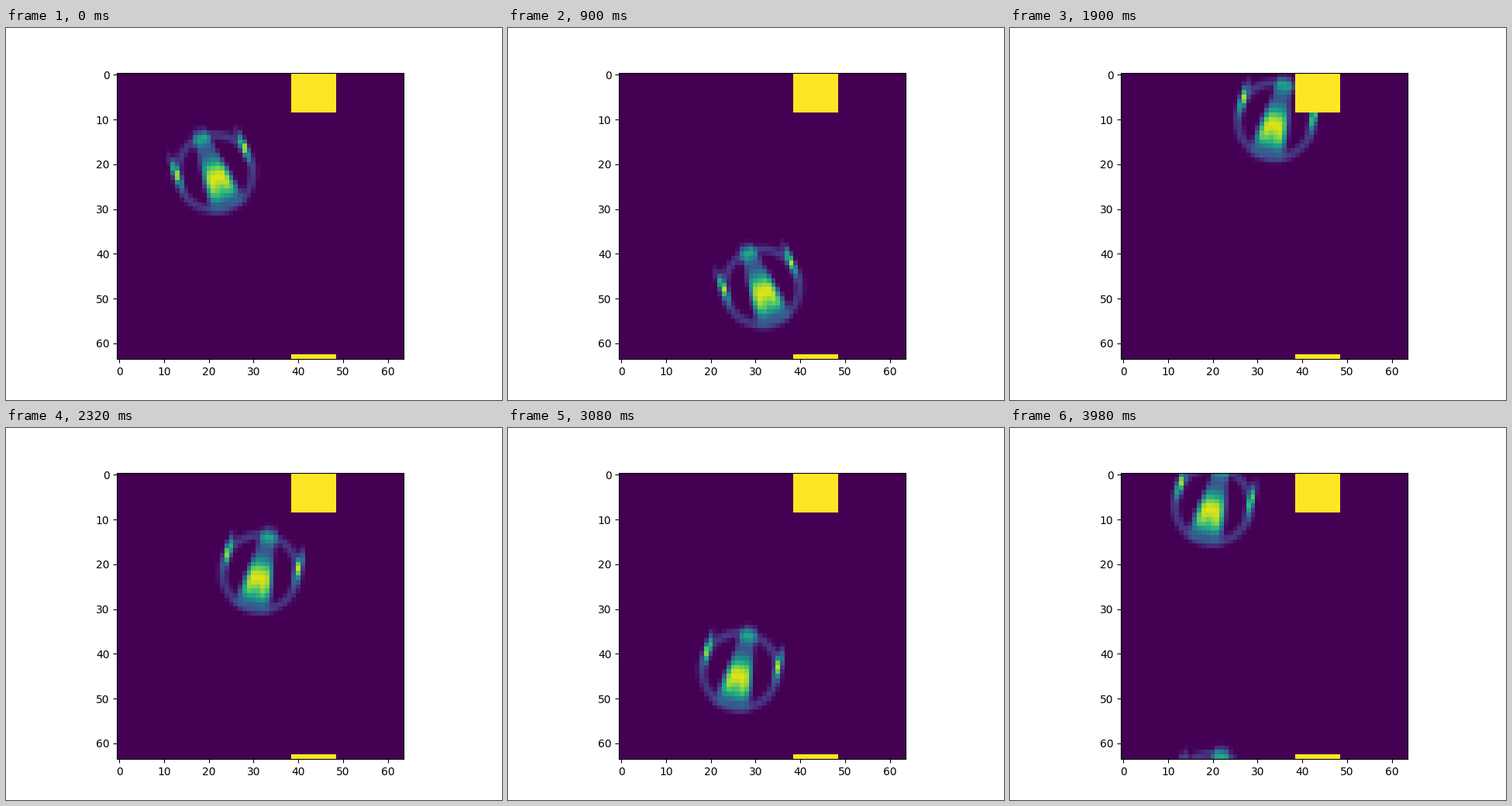
Animation, 640 px wide and 480 px high, one loop 4 s. Source, as a matplotlib script:

```python
import matplotlib.pyplot as plt
import numpy as np
from matplotlib.animation import FuncAnimation

SIZE, FRAMES, INTERVAL = 64, 200, 20

# Flight of the glider: straight in, bounce off the block, straight out.
KEY_STEP = [0, 63, 74, 95, 137, 199]
KEY_X = [21.4, 35.4, 36.3, 34.0, 29.0, 20.0]
KEY_Y = [21.9, 57.7, 63.6, 74.2, 97.6, 134.8]
KEY_HEADING = [21.4, 21.4, 14, -13.5, -13.5, -13.5]  # degrees from straight down

rows, cols = np.mgrid[:SIZE, :SIZE]
wall = np.zeros((SIZE, SIZE), bool)
wall[:9, 39:49] = wall[-1, 39:49] = True


def bell(x, m, s):
    return np.exp(-((x - m) / s) ** 2 / 2)


def wrap(d):
    """Shortest signed distance on the torus."""
    return (d + SIZE / 2) % SIZE - SIZE / 2


def glider(u, v):
    """Density at u cells ahead of the centre and v cells to its side."""
    side = np.abs(v)
    head = np.exp(-(np.clip(u - 1.7, 0, None) / 5) ** 3)
    back = bell(np.minimum(u, 1.7), 1.7, 3.8)
    tail = 0.42 * bell(u, -7.7, 1.5)
    width = np.clip(2.8 + 0.12 * u, 1.7, None)
    core = (head * back + tail) * np.exp(-(side / width) ** 5)
    dip = 0.18 * bell(u, 3.7, 1.2) * bell(v, 0, 1)
    ring = 0.19 * bell(np.hypot(u, v), 8.4, 0.75)
    flanks = 0.75 * bell(u, -3.1, 2.2) * bell(side, 8.1, 0.5)
    return np.clip(core - dip + ring + flanks - 0.02, 0, 1)


def field(i):
    x, y, heading = (np.interp(i, KEY_STEP, k)
                     for k in (KEY_X, KEY_Y, KEY_HEADING))
    sin, cos = np.sin(np.radians(heading)), np.cos(np.radians(heading))
    dx, dy = wrap(cols - x), wrap(rows - y)
    cells = glider(dx * sin + dy * cos, dx * cos - dy * sin)
    return np.where(wall, 1, cells)


fig, ax = plt.subplots(figsize=(6.4, 4.8), dpi=100)
img = ax.imshow(field(0), cmap="viridis", vmin=0, vmax=1)


def draw(i):
    img.set_data(field(i))
    return [img]


anim = FuncAnimation(fig, draw, frames=FRAMES, interval=INTERVAL,
                     repeat=True, repeat_delay=0)
plt.show()
```
